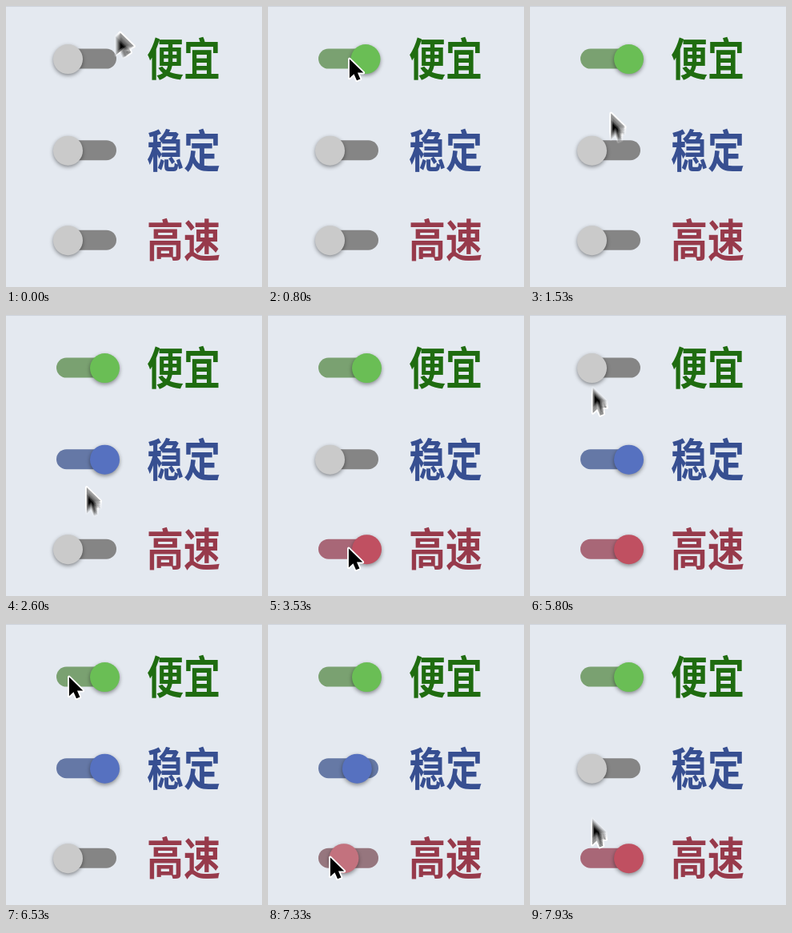
These frames come from a looping animation (320x352 px, 8 s). An HTML page with a canvas:

```html
<!DOCTYPE html>
<html lang="zh-CN">
<head>
<meta charset="utf-8">
<title>便宜 稳定 高速</title>
<style>
html, body { margin: 0; width: 100%; height: 100%; overflow: hidden; background: #e4e9f0; }
canvas { display: block; width: 320px; height: 352px; }
</style>
</head>
<body>
<canvas id="stage" width="320" height="352"></canvas>
<script>
const ctx = document.getElementById('stage').getContext('2d');
const LOOP = 8000;
const SLIDE = 270;
const OFF_KNOB = [202, 202, 202];
const OFF_TRACK = [133, 133, 133];

// flips: times at which each switch changes state, starting from off
const rows = [
  { y: 66.1, label: '便宜', ink: '#1f6c10', knob: [106, 190, 85], track: [122, 161, 113],
    flips: [560, 5030, 6115] },
  { y: 180.7, label: '稳定', ink: '#374f91', knob: [86, 113, 192], track: [101, 120, 166],
    flips: [1885, 3045, 5005, 7240] },
  { y: 293.2, label: '高速', ink: '#973a4b', knob: [192, 80, 97], track: [168, 103, 119],
    flips: [3020, 6140, 7218] }
];

// pointer moves: centre time, duration, destination
const start = [170, 7];
const moves = [
  [13, 440, 100, 64],
  [1491, 440, 99, 178],
  [2644, 440, 99, 290],
  [3850, 400, 76, 290],
  [4613, 440, 76, 178],
  [5724, 440, 77, 64],
  [6840, 500, 76, 290],
  [7962, 440, 76, 178]
];

const clamp = v => Math.min(1, Math.max(0, v));
const smooth = v => { const k = clamp(v); return k * k * (3 - 2 * k); };
const lerp = (a, b, k) => a + (b - a) * k;
const blend = (a, b, k) => `rgb(${a.map((v, i) => Math.round(lerp(v, b[i], k))).join(',')})`;

function level(flips, t) {
  return flips.reduce((v, at, i) => lerp(v, i % 2 ? 0 : 1, smooth((t - at) / SLIDE)), 0);
}

function pointerAt(t) {
  return moves.reduce(([x, y], [mid, span, tx, ty]) => {
    const k = smooth((t - mid) / span + 0.5);
    return [lerp(x, tx, k), lerp(y, ty, k)];
  }, start);
}

function drawSwitch({ y, knob, track, flips }, t) {
  const on = level(flips, t);
  ctx.fillStyle = blend(OFF_TRACK, track, clamp(on * 1.3));
  ctx.beginPath();
  ctx.roundRect(63, y - 12.5, 75, 25, 12.5);
  ctx.fill();

  ctx.save();
  ctx.shadowColor = 'rgba(0,0,0,.42)';
  ctx.shadowBlur = 5;
  ctx.shadowOffsetY = 2;
  ctx.fillStyle = blend(OFF_KNOB, knob, clamp(on * 1.9));
  ctx.beginPath();
  ctx.arc(lerp(77.5, 123.5, on), y + 0.5, 18.5, 0, Math.PI * 2);
  ctx.fill();
  ctx.restore();
}

function drawLabel({ y, label, ink }) {
  ctx.save();
  ctx.translate(176, y);
  ctx.scale(1, 1.22);
  ctx.font = '700 46px "Noto Sans CJK SC", "Noto Sans CJK", sans-serif';
  ctx.fillStyle = ink;
  ctx.fillText(label, 0, 17.2);
  ctx.restore();
}

const arrow = new Path2D('M0 0V17.2L4 13.5L6.6 19.4L9.8 18L7.3 12.3H12.6Z');

function drawArrow([x, y], alpha) {
  ctx.save();
  ctx.globalAlpha = alpha;
  ctx.translate(x + 1.9, y + 2.6);
  ctx.scale(1.38, 1.38);
  ctx.lineWidth = 2.7;
  ctx.lineJoin = 'round';
  ctx.strokeStyle = '#fff';
  ctx.stroke(arrow);
  ctx.fillStyle = '#000';
  ctx.fill(arrow);
  ctx.restore();
}

// average several moments within the shutter time for motion blur
function drawPointer(t) {
  const [ax, ay] = pointerAt(t - 12);
  const [bx, by] = pointerAt(t + 12);
  if (Math.hypot(bx - ax, by - ay) < 0.3) {
    drawArrow(pointerAt(t), 1);
    return;
  }
  const copies = 7;
  for (let i = 0; i < copies; i++) {
    drawArrow(pointerAt(t + lerp(-12, 12, i / (copies - 1))), 1 / (i + 1));
  }
}

function draw(t) {
  ctx.fillStyle = '#e4e9f0';
  ctx.fillRect(0, 0, 320, 352);
  ctx.fillStyle = '#ced3db';
  ctx.fillRect(0, 0, 320, 1);
  for (const row of rows) {
    drawSwitch(row, t);
    drawLabel(row);
  }
  drawPointer(t);
}

const begin = performance.now();
function tick() {
  draw((performance.now() - begin) % LOOP);
  requestAnimationFrame(tick);
}
tick();
</script>
</body>
</html>
```
